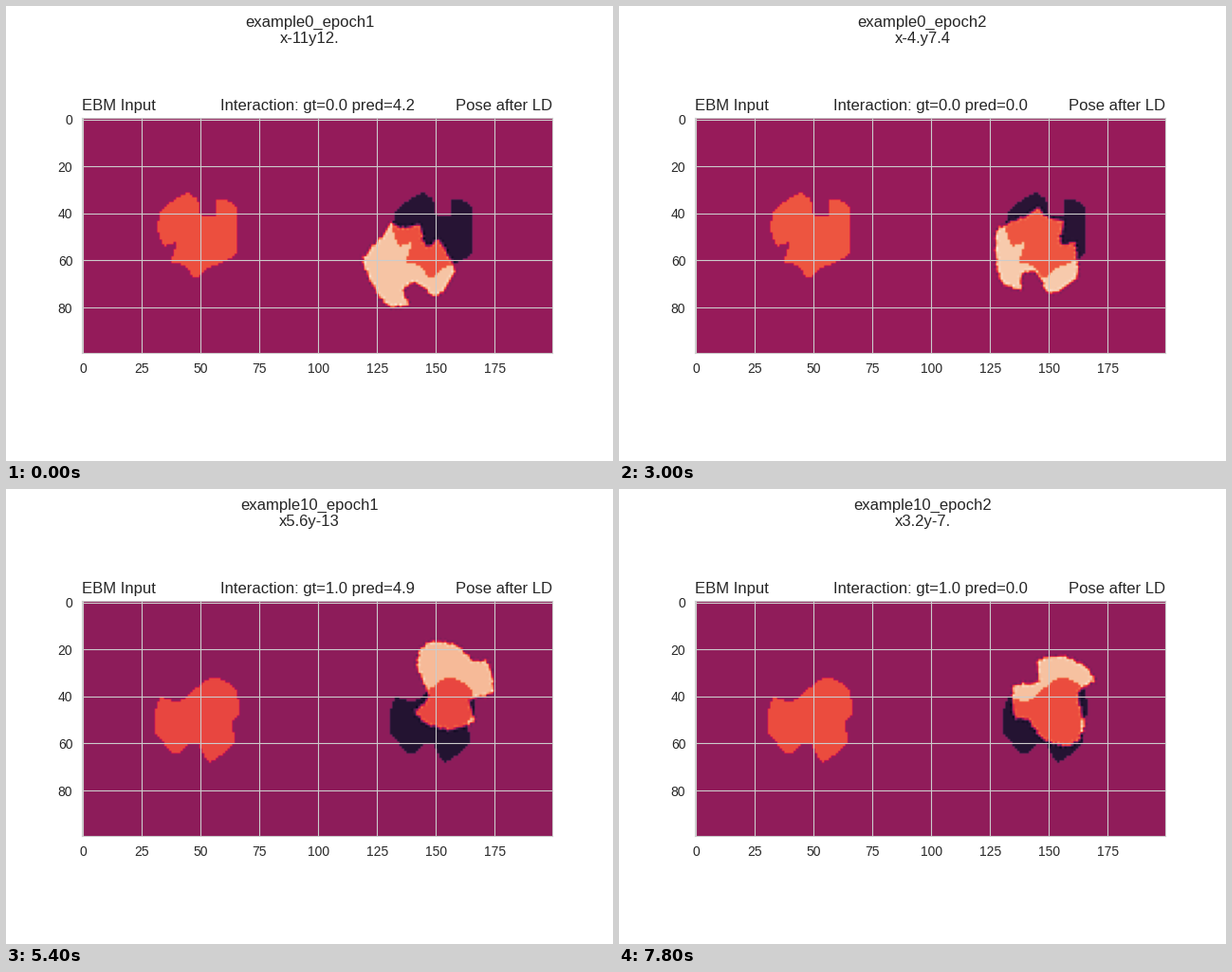
Recreate the animation shown at these times as a matplotlib script. Size 640 px wide and 480 px high, loop 8000 ms.

```python
import numpy as np
import matplotlib.pyplot as plt
from matplotlib.animation import FuncAnimation
from matplotlib.colors import LinearSegmentedColormap
from matplotlib.path import Path

plt.rcParams.update({
    "font.family": "Liberation Sans", "font.size": 10,
    "text.color": ".15", "xtick.color": ".15", "ytick.color": ".15",
    "xtick.major.size": 0, "ytick.major.size": 0,
    "xtick.major.pad": 7, "ytick.major.pad": 7,
    "axes.edgecolor": ".8", "axes.axisbelow": True,
    "axes.grid": True, "grid.color": ".8",
})

N = 100          # side of one square field
SCALE = 2.48     # screen pixels per cell
TILT = 30        # rotation of the stored ligand against its drawn outline

ROCKET = LinearSegmentedColormap.from_list("rocket", [
    "#03051a", "#221331", "#451c47", "#691f55", "#921c5b", "#b91657",
    "#d92847", "#ed503e", "#f47d57", "#f6a47c", "#f7c9aa", "#faebdd"])

# Key points of the outlines, in screen pixels
RECEPTOR_A = [
    (162, 219), (175, 207), (192, 198), (202, 206), (206, 221), (221, 221),
    (222, 204), (243, 213), (243, 262), (213, 278), (200, 288), (187, 274),
    (173, 272), (180, 250), (167, 254), (160, 238)]
RECEPTOR_B = [
    (163, 220), (182, 226), (209, 204), (224, 200), (243, 213), (246, 237),
    (239, 248), (240, 270), (215, 289), (203, 271), (193, 269), (179, 281),
    (158, 259), (157, 237)]
LIGAND_A = [
    (406, 230), (420, 235), (436, 231), (440, 249), (446, 255), (456, 247),
    (473, 278), (462, 301), (451, 307), (433, 292), (418, 300), (424, 315),
    (404, 318), (390, 301), (376, 269), (398, 242)]
LIGAND_B = [
    (449, 162), (474, 165), (493, 182), (507, 183), (514, 215), (488, 224),
    (494, 245), (470, 255), (445, 249), (431, 236), (445, 222), (441, 207),
    (433, 187), (437, 170)]

rows, cols = np.mgrid[:N, :N].astype(float)


def curve(points, bend=.25, steps=8):
    """Closed cardinal spline through the points."""
    p = np.array(points, float)
    q = np.roll(p, -1, axis=0)
    slope = bend * (q - np.roll(p, 1, axis=0))
    t = np.arange(steps)[None, :, None] / steps
    ease = t * t * (3 - 2 * t)
    path = (p[:, None] * (1 - ease) + q[:, None] * ease
            + slope[:, None] * t * (1 - t)**2
            - np.roll(slope, -1, axis=0)[:, None] * t * t * (1 - t))
    return path.reshape(-1, 2).T


def rotate(x, y, degrees):
    c, s = np.cos(np.radians(degrees)), np.sin(np.radians(degrees))
    return c * x - s * y, s * x + c * y


def fill(x, y):
    cells = np.column_stack([cols.ravel(), rows.ravel()])
    path = Path(np.column_stack([x, y]))
    return path.contains_points(cells).reshape(N, N).astype(float)


def receptor(points):
    x, y = curve(points)
    return fill((x - 80) / SCALE - .5, (y - 118.4) / SCALE - .5)


def ligand(points, cx, cy):
    x, y = curve(points)
    x, y = rotate((x - cx) / SCALE, (y - cy) / SCALE, -TILT)
    return fill(x + 50, y + 50)


def cubic(d, a=-.75):
    d = np.abs(d)
    near = (a + 2) * d**3 - (a + 3) * d**2 + 1
    far = a * (d**3 - 5 * d**2 + 8 * d - 4)
    return np.where(d <= 1, near, np.where(d < 2, far, 0))


def place(mask, x, y, angle):
    """Rotate and shift a mask with bicubic sampling."""
    bx, by = rotate(cols - 50 - x, rows - 49.5 - y, -angle - TILT)
    bx, by = bx + 50, by + 50
    ix, iy = np.floor(bx).astype(int), np.floor(by).astype(int)
    out = np.zeros((N, N))
    for j in range(-1, 3):
        for i in range(-1, 3):
            weight = cubic(bx - ix - i) * cubic(by - iy - j)
            out += weight * mask[np.clip(iy + j, 0, N - 1),
                                 np.clip(ix + i, 0, N - 1)]
    return out


PAIR_A = receptor(RECEPTOR_A), ligand(LIGAND_A, 425, 273)
PAIR_B = receptor(RECEPTOR_B), ligand(LIGAND_B, 467, 209)

# name, masks, gt, pred, two steps and the pose (x, y, angle) at each
RUNS = [
    ("example0_epoch1", PAIR_A, 0, 4.2, (0, 6),
     (-11.4, 12.3, 0), (-11.1, 12.9, 96)),
    ("example0_epoch2", PAIR_A, 0, 0, (2, 9),
     (-3.9, 6.8, 47), (-3.95, 6.6, -6)),
    ("example10_epoch1", PAIR_B, 1, 4.9, (0, 7),
     (4.9, -12.6, -70), (5.6, -13.4, 0)),
    ("example10_epoch2", PAIR_B, 1, 0, (2, 9),
     (4.0, -5.0, 43), (3.2, -7.9, 190)),
]
STEPS = 10

fig = plt.figure(figsize=(6.4, 4.8), dpi=100, facecolor="white")
ax = fig.add_subplot()
im = ax.imshow(np.zeros((N, 2 * N)), cmap=ROCKET)
ax.set_xticks(range(0, 200, 25))
ax.set_yticks(range(0, 100, 20))
ax.set_title("EBM Input", loc="left")
ax.set_title("Pose after LD", loc="right")
mid = ax.set_title("")
head = fig.suptitle("")


def draw(frame):
    run, step = divmod(frame, STEPS)
    name, (rec, lig), gt, pred, (a, b), start, end = RUNS[run]
    u = (step - a) / (b - a)
    x, y, angle = np.array(start) * (1 - u) + np.array(end) * u
    sway = .8 * np.sin(np.pi * u)
    x, y = round(x - sway, 4), round(y + sway, 4)
    im.set_data(np.hstack([rec, 2 * place(lig, x, y, angle) - rec]))
    im.autoscale()
    mid.set_text(f"Interaction: gt={gt:.1f} pred={pred:.1f}")
    head.set_text(f"{name}\nx{str(x)[:3]}y{str(y)[:3]}")
    return im, mid, head


anim = FuncAnimation(fig, draw, frames=STEPS * len(RUNS), interval=200,
                     repeat=True, repeat_delay=0, blit=False)
plt.show()
```
